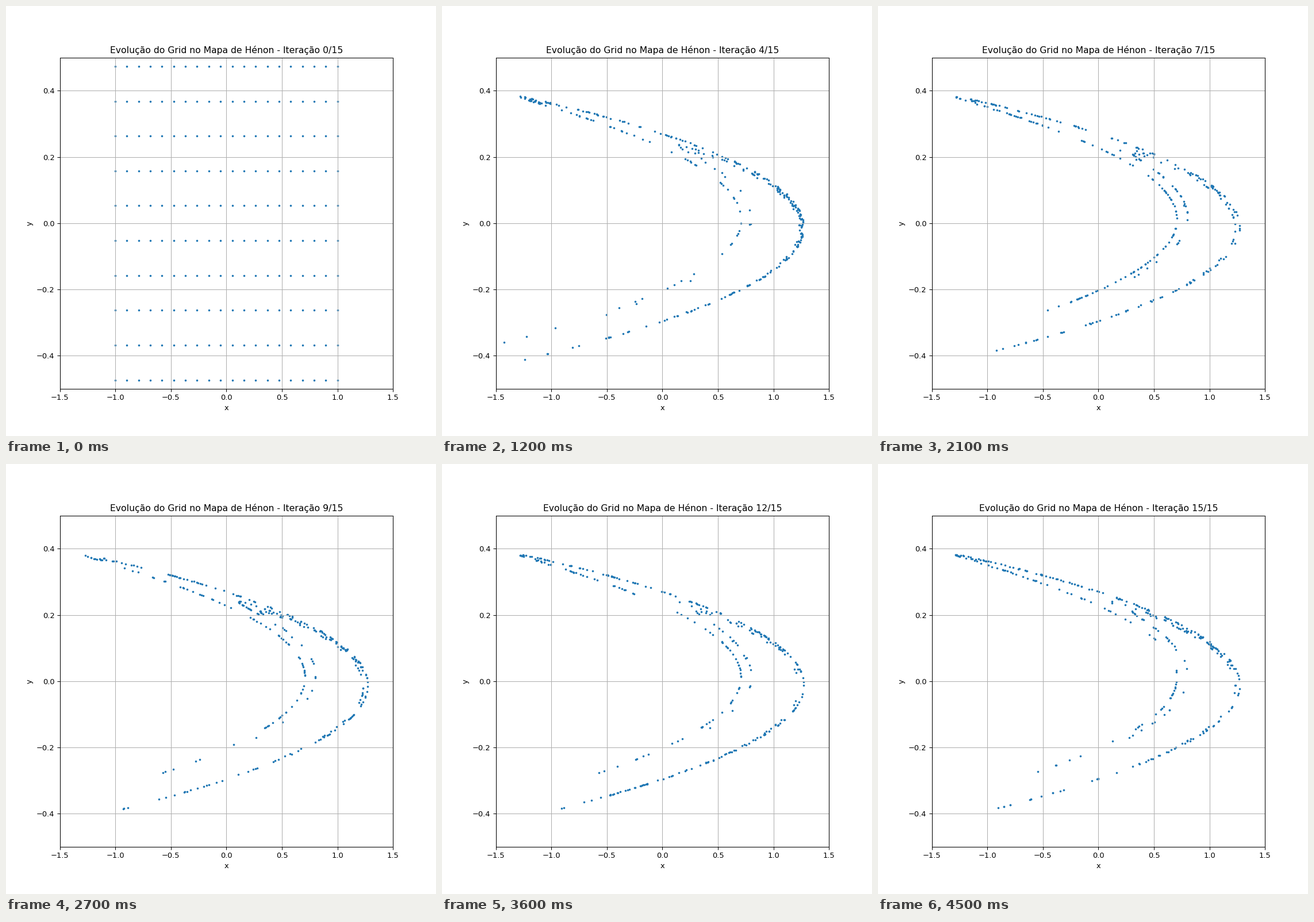
Animation of 748 by 748 pixels, one loop 4800 ms. Source, as a matplotlib script:

```python
import numpy as np
import matplotlib.pyplot as plt
from matplotlib.animation import FuncAnimation

plt.rcParams["font.family"] = "DejaVu Sans"

A, B = 1.4, 0.3
STEPS = 15
SIDE = 20
LIMIT = 1e3  # points beyond this have escaped


def henon(x, y):
    return 1 - A * x**2 + y, B * x


def build_orbits():
    axis = np.linspace(-1, 1, SIDE)
    x, y = (g.ravel() for g in np.meshgrid(axis, axis))
    orbits = [np.column_stack((x, y))]
    for _ in range(STEPS):
        x, y = henon(x, y)
        x = np.where(np.abs(x) < LIMIT, x, np.nan)
        orbits.append(np.column_stack((x, y)))
    return orbits


orbits = build_orbits()

fig, ax = plt.subplots(figsize=(8, 8), dpi=93.5)
ax.set_xlim(-1.5, 1.5)
ax.set_ylim(-0.5, 0.5)
ax.set_xlabel("x")
ax.set_ylabel("y")
ax.grid(True)
dots = ax.scatter(*orbits[0].T, s=3, color="#1f77b4")
title = ax.set_title("")


def update(step):
    dots.set_offsets(np.ma.masked_invalid(orbits[step]))
    title.set_text(f"Evolução do Grid no Mapa de Hénon - Iteração {step}/{STEPS}")
    return dots, title


ax.set_xlim(-1.5, 1.5)
ax.set_ylim(-0.5, 0.5)
update(0)

anim = FuncAnimation(fig, update, frames=STEPS + 1, init_func=lambda: update(0),
                     interval=300, repeat=True, repeat_delay=0, blit=False)
plt.show()
```
